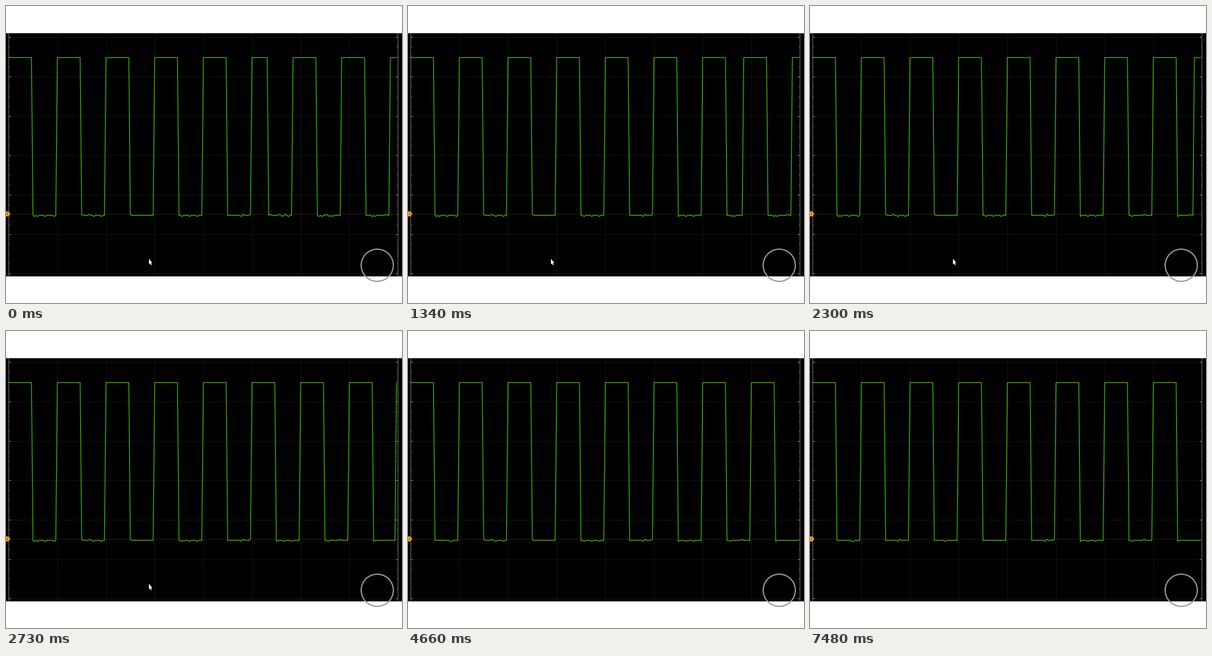
Write a matplotlib script that moves like this. It is 640 px wide and 480 px high and loops after 8000 ms.

```python
import numpy as np
import matplotlib.pyplot as plt
from matplotlib.animation import FuncAnimation
from matplotlib.patches import Circle, Polygon, Rectangle

W, H, DPI = 640, 480, 100
PX = 72 / DPI
LOOP, STEP = 8000, 20

# Sampled square wave: 256 points, 32 per period
X0, DX, PERIOD = 4.3, 2.458, 32
HIGH, LOW = 83.4, 338.4
k = np.arange(256)
xs = X0 + DX * k

RESTART = 3720       # the second sweep begins, in ms
CURSOR_GONE = 3980
SPEED = 0.0832       # px per ms

rng = np.random.default_rng(4)


def trace(shift=0):
    """Square wave with small random dips and peaks on its low level."""
    ripple = rng.choice([0, 1.8, -1.8], size=k.size, p=[0.82, 0.12, 0.06])
    return np.where((k + shift) % PERIOD < PERIOD // 2, HIGH, LOW + ripple)


oldest, middle, newest = trace(5), trace(), trace()


def signal(t):
    """Fresh samples left of the sweep, those of the last pass right of it."""
    if t < RESTART:
        sweep = np.interp(t, [220, 320, 760, 2700], [422, 435, 470.6, 630])
        return np.where(xs <= sweep, middle, oldest)
    return np.where(xs <= 5 + SPEED * (t - RESTART), newest, middle)


fig = plt.figure(figsize=(W / DPI, H / DPI), dpi=DPI, facecolor="white")
ax = fig.add_axes([0, 0, 1, 1])
ax.set(xlim=(0, W), ylim=(H, 0))
ax.axis("off")


def rect(x, y, w, h, color, z=1):
    ax.add_patch(Rectangle((x, y), w, h, fc=color, lw=0, zorder=z,
                           antialiased=False))


rect(0, 44, W, 393, "black")

# Graticule and edge scales
for i in range(1, 8):
    rect(round(X0 + DX * PERIOD * i), 44, 1, 393, "#111111")
for i in range(7):
    rect(5, round(50.4 + 63.65 * i), 629, 1, "#111111")
for x in (4, 633):
    rect(x, 44, 1, 393, "#6c6c6c", 2)
for i in range(25):
    y, size = round(50.4 + 63.65 / 4 * i), 3 if i % 4 == 0 else 1
    rect(5, y, size, 1, "#8a8a8a", 2)
    rect(633 - size, y, size, 1, "#8a8a8a", 2)
rect(5, 336, 629, 1, "#301600")

# Channel marker
ax.add_patch(Polygon([(0, 332), (4, 332), (7, 336), (4, 340), (0, 340)],
                     fc="#f0a020", lw=0, zorder=3))
rect(2, 334, 1, 4, "#7a4a00", 4)

ax.add_patch(Circle((600, 419), 26, fill=False, ec="#999999", lw=2 * PX,
                    zorder=5))
cursor = ax.add_patch(Polygon(
    [(231, 408.5), (231, 417.5), (232.8, 416), (234.2, 419), (235.5, 418.4),
     (234.2, 415.5), (236.5, 415.2)], fc="white", lw=0, zorder=6))
line, = ax.plot(xs, middle, color="#3ccc08", lw=1.15 * PX, zorder=4,
                solid_joinstyle="round")


def update(frame):
    t = frame * STEP
    line.set_ydata(signal(t))
    cursor.set_visible(t < CURSOR_GONE)
    return line, cursor


anim = FuncAnimation(fig, update, frames=LOOP // STEP, interval=STEP,
                     repeat=True, repeat_delay=0, blit=False)
plt.show()
```
